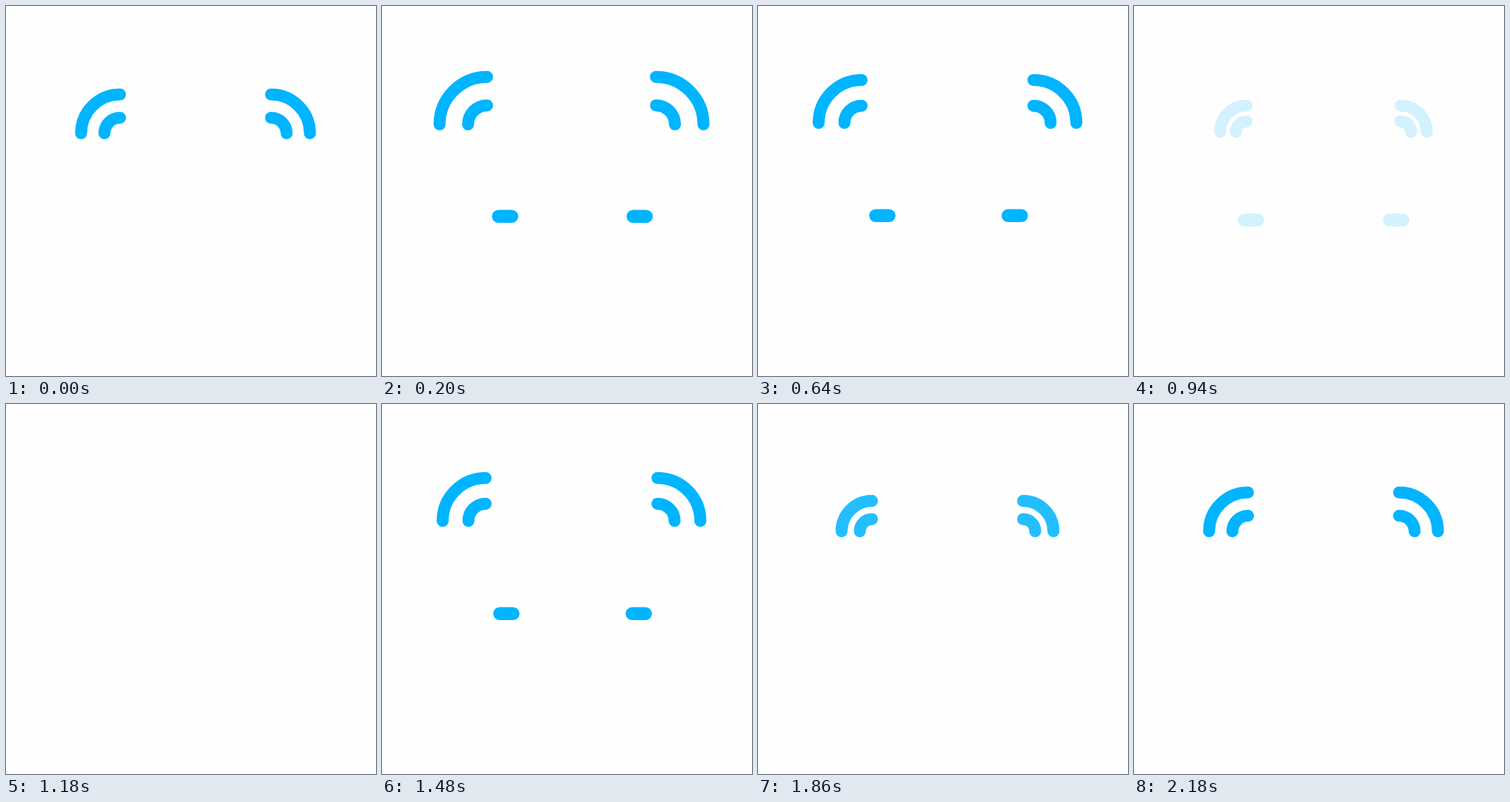
These frames come from a looping animation (500 px wide and 500 px high, 2240 ms). An HTML page with a canvas:

```html
<!DOCTYPE html>
<html lang="en">
<head>
<meta charset="utf-8">
<title>Pulse</title>
<style>
html, body { margin: 0; height: 100%; overflow: hidden; background: #fefefe; }
canvas { display: block; }
</style>
</head>
<body>
<canvas id="stage" width="500" height="500"></canvas>
<script>
const ctx = document.getElementById('stage').getContext('2d');
const LOOP = 2240, STEP = 20, PULSE = 13, GROW = 22;
const PULSES = [100, 520, 940, 1360], GROW_START = 1760;
const REST = { x: 154, y: 172, r: 52.5 };
const AXIS = 256.1;

// Two nested quarter rings, mirrored on the right
function drawArcs(x, y, r, alpha) {
  ctx.globalAlpha = alpha;
  ctx.lineWidth = 16.2;
  for (const radius of [r, r * 0.4]) {
    ctx.beginPath();
    ctx.arc(x, y, radius, Math.PI, Math.PI * 1.5);
    ctx.stroke();
    ctx.beginPath();
    ctx.arc(2 * AXIS - x, y, radius, -Math.PI / 2, 0);
    ctx.stroke();
  }
}

function drawDash(x, y) {
  ctx.beginPath();
  ctx.moveTo(x - 9, y);
  ctx.lineTo(x + 9, y);
  ctx.stroke();
}

function drawPulse(u, first) {
  const fadeOut = Math.min(1, (PULSE - u) / 6);
  const alpha = first ? fadeOut : Math.min(u / 6, fadeOut);
  const r = first ? REST.r + 1.95 * u : 31.6 + 3.95 * u - 0.025 * u * u;
  drawArcs(REST.x - 2 * u, REST.y - 2 * u, r, alpha);
  if (first && u < 6) return;
  ctx.lineWidth = 17.5;
  drawDash(156.4 + 1.66 * u, 290.3 - u);
  drawDash(355.4 - 1.2 * u, 290.3 - u);
}

function draw(t) {
  ctx.globalAlpha = 1;
  ctx.fillStyle = '#fefefe';
  ctx.fillRect(0, 0, 500, 500);
  ctx.strokeStyle = '#00b4ff';
  ctx.lineCap = 'round';

  const stepsFrom = start => Math.floor((t - start) / STEP) + 1;
  if (t < PULSES[0]) {
    drawArcs(REST.x, REST.y, REST.r, 1);
  } else if (t >= GROW_START) {
    const u = Math.min(GROW, stepsFrom(GROW_START));
    drawArcs(REST.x, REST.y, REST.r * (0.7 + 0.3 * u / GROW), Math.min(1, u / 7));
  } else {
    const i = PULSES.findLastIndex(start => t >= start);
    const u = stepsFrom(PULSES[i]);
    if (u < PULSE) drawPulse(u, i === 0);
  }
}

const began = performance.now();
function tick() {
  draw((performance.now() - began) % LOOP);
  requestAnimationFrame(tick);
}
tick();
</script>
</body>
</html>
```
